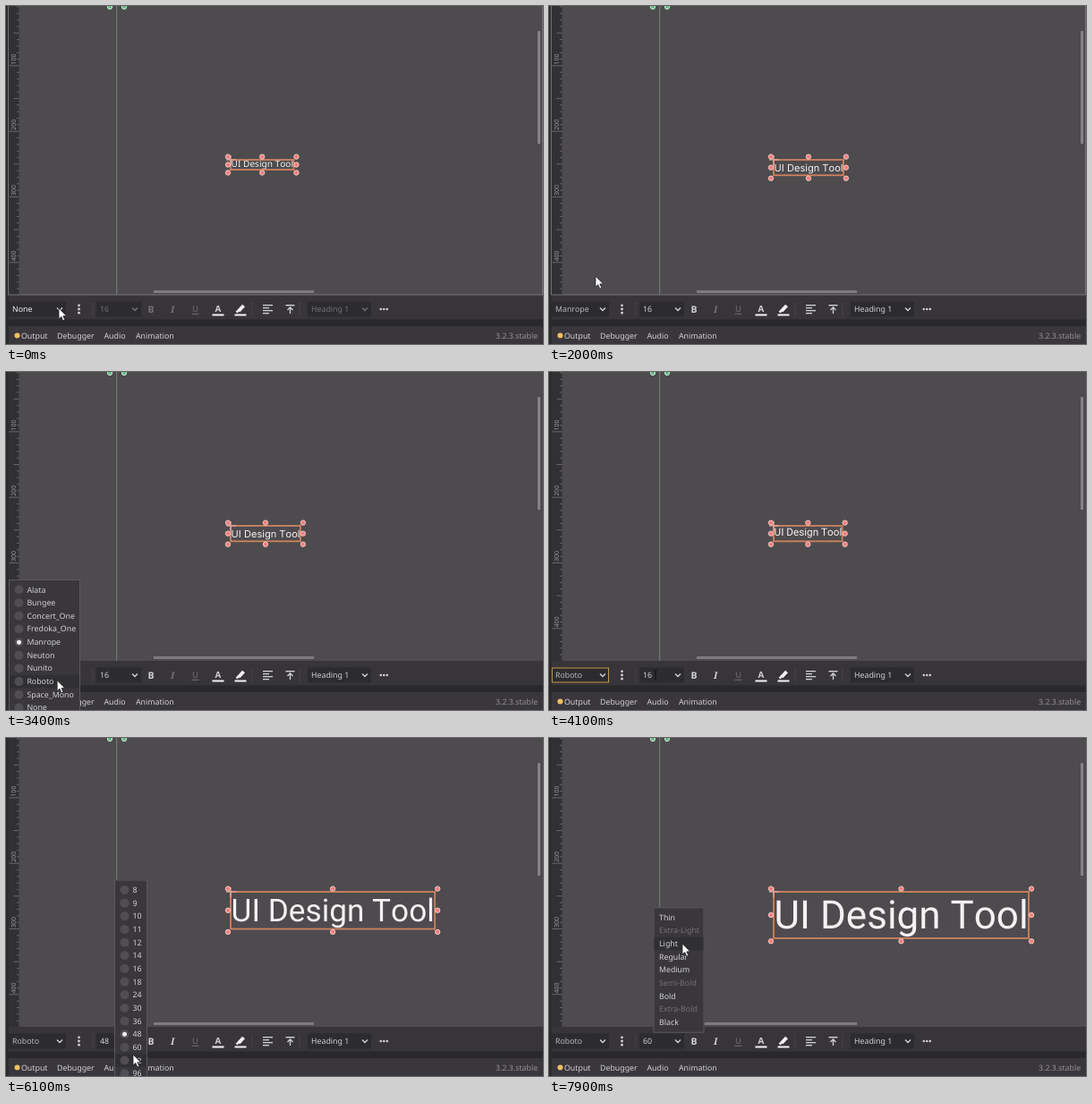
An HTML page with a canvas for the animation above (8 s loop, 600 by 378 pixels).

```html
<!DOCTYPE html>
<html lang="en">
<head>
<meta charset="utf-8">
<title>Text tool</title>
<style>
html, body { margin: 0; height: 100%; overflow: hidden; background: #4d4b4e; }
canvas { display: block; width: 600px; height: 378px; }
</style>
</head>
<body>
<canvas id="stage"></canvas>
<script>
const LOOP = 8000, STEP = 100, MOVE = 450, ROW = 14.66, ZOOM = 0.7333;
const UI = '"Noto Sans", sans-serif';
const ON = '#d2d1d3', OFF = '#737175', BRIGHT = '#f3f1f2';
const PANEL = '#373539', FIELD = '#2c2b2e', FOCUS = '#c39a4b';
const stage = document.getElementById('stage');
const c = stage.getContext('2d');
const ratio = window.devicePixelRatio || 1;
stage.width = 600 * ratio;
stage.height = 378 * ratio;

const fontMenu = {
  x: 3, y: 232, w: 80, radio: true, open: [[200, 1000], [1500, 2000], [2400, 3500]],
  items: 'Alata Bungee Concert_One Fredoka_One Manrope Neuton Nunito Roboto Space_Mono None'.split(' ')
};
const sizeMenu = {
  x: 121, y: 158.5, w: 37, radio: true, open: [[4500, 5100], [5700, 6600]],
  items: '8 9 10 11 12 14 16 18 24 30 36 48 60 72 96'.split(' ')
};
const weightMenu = {
  x: 116.5, y: 189.3, w: 57, open: [[7300, LOOP]],
  items: 'Thin Extra-Light Light Regular Medium Semi-Bold Bold Extra-Bold Black'.split(' '),
  disabled: /Extra|Semi/
};

// Label metrics in multiples of the text size
const styles = {
  None: { face: UI, scale: 0.861, base: 0.71, height: 0.94 },
  Bungee: { face: 'Inter, sans-serif', weight: 900, scale: 1.07, base: 0.92, height: 1.11, caps: true },
  Manrope: { face: 'Inter, sans-serif', scale: 0.946, base: 1.11, height: 1.475 },
  Roboto: { face: 'Roboto, sans-serif', scale: 1, base: 0.94, height: 1.18, minHeight: 17.3 }
};

const rowY = (menu, i) => menu.y + 11.5 + i * ROW;
const onItem = (menu, item, x) => [x, rowY(menu, menu.items.indexOf(item))];
const within = (t, spans) => spans.some(([a, b]) => t >= a && t < b);

// Pointer moves: start time and destination
const fontArrow = [59, 338];
const moves = [
  [-MOVE, fontArrow],
  [450, onItem(fontMenu, 'Bungee', 53)],
  [1100, fontArrow],
  [1550, onItem(fontMenu, 'Manrope', 52)],
  [2000, [58, 336]],
  [3050, onItem(fontMenu, 'Roboto', 57)],
  [3600, [119, 339]],
  [4100, [145, 338]],
  [4600, onItem(sizeMenu, '48', 146)],
  [5650, [142, 354]],
  [6150, onItem(sizeMenu, '60', 145)],
  [6700, [160, 338]],
  [7450, onItem(weightMenu, 'Light', 149)]
];

function pointerAt(t) {
  let [x, y] = fontArrow;
  for (const [start, [toX, toY]] of moves) {
    const u = Math.min(1, Math.max(0, (t - start) / MOVE)), k = u * u * (3 - 2 * u);
    x += (toX - x) * k;
    y += (toY - y) * k;
  }
  return [x, y];
}

function rect(x, y, w, h, color) {
  c.fillStyle = color;
  c.fillRect(x, y, w, h);
}

function frame(x, y, w, h, color, width = 1) {
  c.strokeStyle = color;
  c.lineWidth = width;
  c.strokeRect(x, y, w, h);
}

function line(color, width, ...pts) {
  c.strokeStyle = color;
  c.lineWidth = width;
  c.beginPath();
  pts.forEach(p => c.lineTo(...p));
  c.stroke();
}

function dot(x, y, r, color, edge) {
  c.beginPath();
  c.arc(x, y, r, 0, 7);
  c.fillStyle = color;
  c.fill();
  if (!edge) return;
  c.strokeStyle = edge;
  c.lineWidth = 1;
  c.stroke();
}

function text(s, x, y, color = ON, font = '8.8px ' + UI) {
  c.font = font;
  c.fillStyle = color;
  c.fillText(s, x, y);
}

function dropdown(label, x, w, color, arrowColor = color) {
  rect(x, 330.5, w, 17, FIELD);
  text(label, x + 4, 342, color);
  const mid = x + w - 7;
  line(arrowColor, 1.4, [mid - 3, 337.5], [mid, 340.5], [mid + 3, 337.5]);
}

function drawRuler() {
  rect(0, 0, 3, 378, '#2b2a2d');
  rect(3, 0, 11.5, 323, '#313033');
  for (let i = 1; i < 45; i++) {
    const y = i * 10 * ZOOM - 6.9, len = i % 10 ? i % 5 ? 2.5 : 6 : 11;
    rect(14.5 - len, y, len, 0.8, '#767478');
    if (i % 10) continue;
    c.save();
    c.translate(10.5, y - 1);
    c.rotate(-Math.PI / 2);
    text(i * 10, 0, 0, '#99979b', '7px ' + UI);
    c.restore();
  }
}

function drawLabel(font, size) {
  const x = 251, y = 172, px = size * ZOOM;
  const { face, weight = 400, scale, base, height, caps, minHeight = 0 } = styles[font];
  const s = caps ? 'UI DESIGN TOOL' : 'UI Design Tool';
  text(s, x + 0.6, y + px * base, BRIGHT, `${weight} ${px * scale}px ${face}`);
  const w = c.measureText(s).width + 1, h = Math.max(minHeight, px * height);
  frame(x, y, w, h, '#cf825f', 1.8);
  line('#e7aaa4', 1.2, [x - 5, y], [x + 6, y]);
  line('#e7aaa4', 1.2, [x, y - 5], [x, y + 6]);
  for (const i of [0, 0.5, 1]) for (const j of [0, 0.5, 1]) {
    if (i !== 0.5 || j !== 0.5)
      dot(x - 3 + i * (w + 6), y - 3.4 + j * (h + 6.8), 2.7, '#ee7f7c', '#f6c7c4');
  }
}

function drawCanvasArea(font, size) {
  rect(0, 0, 600, 378, '#4d4b4e');
  drawRuler();
  rect(123.2, 0, 1, 323, '#78827a');
  for (const x of [116, 132]) dot(x, 1, 2.6, '#64bd83', '#cfead8');
  rect(165, 318, 179, 3, '#7d7b7e');
  rect(594, 28, 3, 126, '#858386');
  drawLabel(font, size);
}

function drawIcons(styled, italic) {
  for (const i of [-1, 0, 1]) {
    dot(81.5, 339 + i * 4.2, 1.4, ON);
    dot(422.3 + i * 3.5, 339, 1.3, ON);
  }
  text('B', 158.5, 342.8, styled, '900 10.5px ' + UI);
  text('I', 184, 342.8, italic, 'italic bold 10.5px "Noto Serif", serif');
  text('U', 208, 342, OFF, '9.5px ' + UI);
  rect(207.5, 343.8, 8, 1, OFF);
  text('A', 233.6, 341.8, ON, 'bold 9.8px ' + UI);
  for (const x of [230.5, 255.5]) rect(x, 344.5, 13, 2, BRIGHT);
  line(BRIGHT, 4, [260, 341], [265.5, 335]);
  line(BRIGHT, 2.5, [257.5, 342.5], [260.5, 340]);
  for (let i = 0; i < 4; i++) rect(287, 334 + i * 3, i % 2 ? 7 : 11, 1.3, ON);
  rect(312.5, 334, 10, 1.4, ON);
  line(ON, 1.3, [317.5, 344], [317.5, 337]);
  line(ON, 1.3, [314.5, 340], [317.5, 337], [320.5, 340]);
  for (const x of [96.5, 274.5, 327.5]) rect(x, 331, 1, 16, '#464449');
}

function drawToolbar(t, font, size, pointer) {
  const styled = font === 'None' ? OFF : ON;
  const hover = pointer[0] < 68 && pointer[1] > 330;
  rect(3, 323, 597, 28, PANEL);
  rect(0, 350.5, 600, 7.5, '#29282b');
  rect(3, 358, 597, 20, '#39373b');
  if (font !== 'Roboto' && !within(t, fontMenu.open))
    frame(2.5, -1, 597, 324, '#757377');

  dropdown(font, 3, 64, hover ? BRIGHT : '#bab8bc', ON);
  dropdown(size, 101, 50, styled);
  dropdown('Heading 1', 337, 71, styled);
  if (within(t, [[3500, 4400]])) frame(3.5, 331, 63, 16, FOCUS);
  if (within(t, [[5100, 5700]])) frame(137, 331, 14, 16, FOCUS);
  drawIcons(styled, font === 'Roboto' ? ON : OFF);

  dot(12.5, 368.5, 3, '#f1bf62');
  text('Output', 17, 371.5);
  text('Debugger', 57, 371.5);
  text('Audio', 109.5, 371.5);
  text('Animation', 145, 371.5);
  text('3.2.3.stable', 547, 371.5, '#939195');
}

function drawMenu({ x, y, w, items, radio, disabled }, picked, [px, py]) {
  const h = items.length * ROW + 8.5;
  rect(x, y, w, h, '#39373b');
  frame(x + 0.5, y + 0.5, w - 1, h - 1, '#5a585c');
  items.forEach((item, i) => {
    const mid = rowY({ y }, i), off = disabled?.test(item);
    const hover = px > x && px < x + w && Math.abs(py - mid) < ROW / 2;
    if (hover && !off) rect(x + 1, mid - ROW / 2, w - 2, ROW, '#302f32');
    if (radio) dot(x + 11.5, mid, 5, '#504e52');
    if (item === picked) dot(x + 11.5, mid, 2.5, BRIGHT);
    text(item, x + (radio ? 20.4 : 6.5), mid + 3, off ? OFF : ON);
  });
}

function drawPointer(x, y, beam) {
  if (beam) {
    line('#18171a', 1.4, [x, y - 5], [x, y + 5]);
    for (const end of [y - 5, y + 5]) line('#18171a', 1, [x - 2, end], [x + 2, end]);
    return;
  }
  c.beginPath();
  [[0, 0], [0, 12], [2.8, 9.5], [4.8, 14], [6.8, 13], [4.8, 8.8], [8.6, 8.6]]
    .forEach(([dx, dy]) => c.lineTo(x + dx, y + dy));
  c.closePath();
  c.fillStyle = '#fff';
  c.fill();
  c.strokeStyle = '#242326';
  c.lineWidth = 0.8;
  c.stroke();
}

function draw(t) {
  const font = t < 1000 ? 'None' : t < 2000 ? 'Bungee' : t < 3500 ? 'Manrope' : 'Roboto';
  const size = t < 5100 ? '16' : t < 6600 ? '48' : '60';
  const pointer = pointerAt(t), [x, y] = pointer;
  c.setTransform(ratio, 0, 0, ratio, 0, 0);
  c.textRendering = 'geometricPrecision';
  c.fontKerning = 'none';
  drawCanvasArea(font, size);
  drawToolbar(t, font, size, pointer);
  const menu = [fontMenu, sizeMenu, weightMenu].find(m => within(t, m.open));
  if (menu) drawMenu(menu, menu === fontMenu ? font : size, pointer);
  drawPointer(x, y, !menu && x > 101 && x < 136 && y > 330);
}

const start = performance.now();
function tick() {
  const t = (performance.now() - start) % LOOP;
  draw(Math.floor(t / STEP) * STEP);
  requestAnimationFrame(tick);
}
tick();
</script>
</body>
</html>
```
